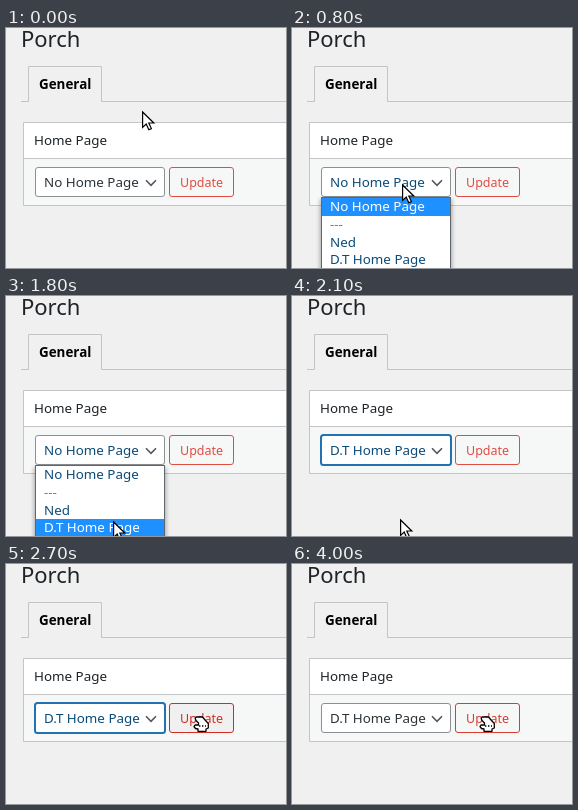
An HTML page for the animation above (5.7 s loop, 280 px wide and 240 px high).

```html
<!DOCTYPE html>
<html lang="en">
<head>
<meta charset="utf-8">
<title>Home page setting</title>
<style>
  html, body { margin: 0; width: 100%; height: 100%; overflow: hidden; background: #f0f0f1; }
  svg { display: block; width: 280px; height: 240px; }
  text { font: 13.4px "Noto Sans", "Open Sans", sans-serif; fill: #1d2327; }
  .title { font-size: 22px; }
  .tab { font-weight: 700; fill: #000; }
  .update { font-size: 12.5px; }
  .line { fill: none; stroke: #c3c4c7; }
  .row text { fill: #0a4b78; }
  .row .rule { fill: #808080; }
  .row rect { fill: none; }
  .row.on rect { fill: #1e90ff; }
  .row.on text { fill: #fff; }
  #shadow { filter: blur(2px); }
</style>
</head>
<body>
<svg viewBox="0 0 280 240">
  <rect width="280" height="240" fill="#f0f0f1"/>
  <text class="title" x="15" y="19">Porch</text>

  <path class="line" d="M15 73.5H22.5V38.5H95.5V73.5H280"/>
  <text class="tab" x="33" y="61">General</text>

  <rect x="17" y="94" width="263" height="36" fill="#fff"/>
  <rect x="17" y="131" width="263" height="47" fill="#f6f7f7"/>
  <path class="line" d="M280 94.5H17.5V177.5H280M17 130.5H280"/>
  <text x="28" y="117">Home Page</text>

  <rect id="select" x="29.5" y="139.5" width="129" height="29" rx="2.5" fill="#fff"/>
  <text id="value" x="38" y="159"></text>
  <path d="M140 152.3L145 157.3L150 152.3" fill="none" stroke="#50575e" stroke-width="1.6"/>

  <rect id="button" x="163.5" y="139.5" width="64" height="29" rx="2.5"/>
  <text id="label" class="update" x="174" y="159">Update</text>

  <g id="menu">
    <rect id="shadow" x="28" y="171" width="132" height="75" opacity=".3"/>
    <rect x="29.5" y="169.5" width="129" height="80" fill="#fff" stroke="#5f666d"/>
    <g class="row"><rect x="30" y="170" width="128" height="18"/><text x="38" y="183">No Home Page</text></g>
    <g class="row"><text class="rule" x="38" y="200.5">---</text></g>
    <g class="row"><rect x="30" y="205" width="128" height="18"/><text x="38" y="219">Ned</text></g>
    <g class="row"><rect x="30" y="223" width="128" height="18"/><text x="38" y="236">D.T Home Page</text></g>
  </g>

  <path id="arrow" d="M.6 1V16.4L4.2 13.1L6.8 18.8L9.4 17.6L6.8 12H11.8Z" fill="#fff" stroke="#000" stroke-width="1.2"/>
  <g id="hand" stroke="#000" stroke-width="1.3" stroke-linejoin="round">
    <path d="M3 1H9.5L12.5 4.5L15.3 7.5V12L13 13V15.3H5V13L2.5 12.5L1 10.5L2 9H5.5V7L3 4.5L2.2 2.5Z" fill="#fff"/>
    <path d="M6 10H13" stroke-dasharray="1.4 1.6" fill="none"/>
  </g>
</svg>
<script>
const LOOP = 5700, TICK = 100;
const $ = id => document.getElementById(id);
const rows = document.querySelectorAll('.row');

// Pointer stops: time, x, y; straight travel between them
const path = [
  [0, 136, 83], [100, 135, 86], [300, 125, 115], [500, 112, 149], [600, 110, 154],
  [700, 110, 154], [800, 110, 156], [1100, 110, 156], [1200, 110, 160],
  [1500, 107, 204], [1600, 110, 214], [1700, 113, 223], [1800, 107, 225],
  [2000, 107, 225], [2100, 108, 223], [2200, 118, 217], [2400, 164, 182],
  [2500, 186, 163], [2600, 201, 155], [2700, 187, 152], [LOOP, 187, 152]
];

function pointer(t) {
  const i = path.findIndex(p => p[0] > t);
  const [a, b] = [path[i - 1], path[i]];
  const k = (t - a[0]) / (b[0] - a[0]);
  return [1, 2].map(n => Math.round(a[n] + (b[n] - a[n]) * k));
}

function paint(el, attrs) {
  for (const name in attrs) el.setAttribute(name, attrs[name]);
}

function show(el, on) {
  el.setAttribute('visibility', on ? 'visible' : 'hidden');
}

// Border, text, fill, border width
function buttonLook(t) {
  if (t < 2500) return ['#e14d43', '#e14d43', '#f6f7f7', 1];
  if (t < 3100) return ['#d02c21', '#d02c21', '#f0f0f1', 1];
  if (t < 3900) return ['#e14d43', '#911f17', '#f6f7f7', 2];
  if (t < 4000) return ['#e14d43', '#e14d43', '#f6f7f7', 1];
  return ['#d93d32', '#d93d32', '#f6f7f7', 1];
}

function draw(t) {
  const [x, y] = pointer(t);
  const over = t >= 2500;
  const open = t >= 800 && t < 2100;
  const focus = t >= 2100 && t < 3100;
  const hover = t >= 500 && t < 800;

  show($('menu'), open);
  const active = t < 1600 ? 0 : t < 1700 ? 2 : 3;
  rows.forEach((row, i) => row.classList.toggle('on', i === active));

  paint($('select'), focus
    ? { stroke: '#2271b1', 'stroke-width': 2, x: 29, y: 139, width: 130, height: 30 }
    : { stroke: '#8c8f94', 'stroke-width': 1, x: 29.5, y: 139.5, width: 129, height: 29 });
  $('value').textContent = t < 2100 ? 'No Home Page' : 'D.T Home Page';
  $('value').style.fill = open || focus ? '#0a4b78' : hover ? '#2271b1' : '#2c3338';

  const [stroke, ink, fill, width] = buttonLook(t);
  const grow = (width - 1) / 2;
  paint($('button'), {
    stroke, fill, 'stroke-width': width,
    x: 163.5 - grow, y: 139.5 - grow, width: 64 + 2 * grow, height: 29 + 2 * grow
  });
  $('label').style.fill = ink;

  show($('arrow'), !over);
  show($('hand'), over);
  paint($(over ? 'hand' : 'arrow'), { transform: `translate(${x} ${y})` });
}

function frame() {
  const t = performance.now() % LOOP;
  draw(Math.floor(t / TICK) * TICK);
  requestAnimationFrame(frame);
}
frame();
</script>
</body>
</html>
```
